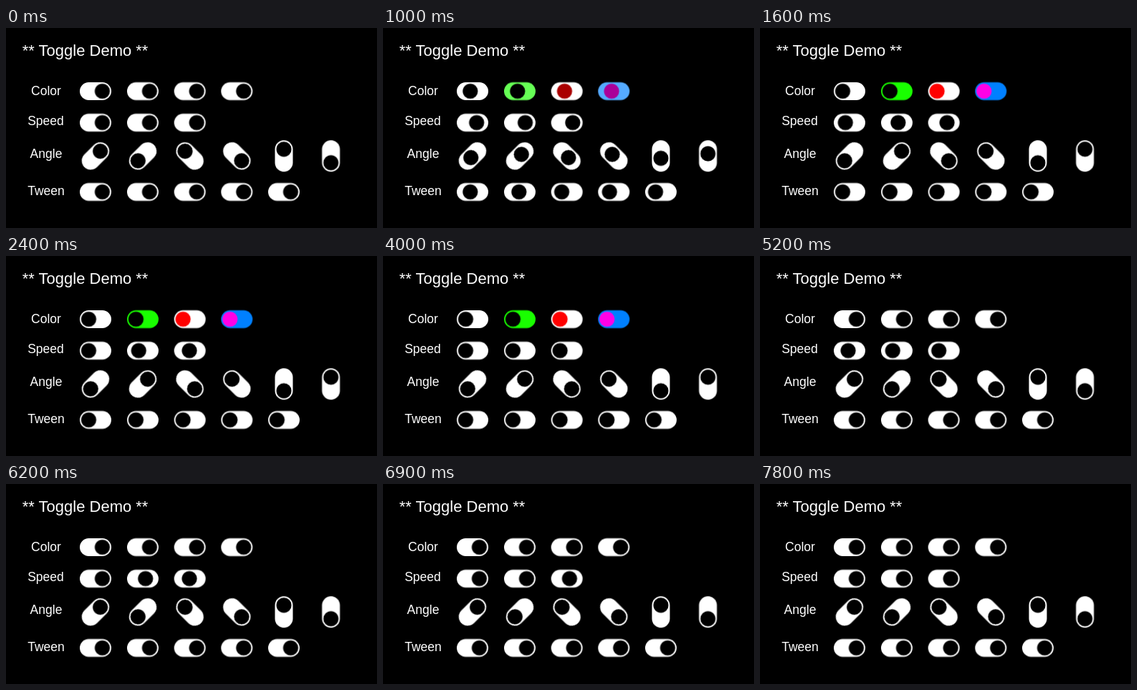
Animation, 518 px wide and 280 px high, one loop 9400 ms. Source, as an HTML page without scripts:

```html
<!DOCTYPE html>
<html lang="en">
<head>
<meta charset="utf-8">
<title>Toggle Demo</title>
<style>
  html, body { margin: 0; width: 100%; height: 100%; overflow: hidden; background: #000; }
  svg { display: block; width: 518px; height: 280px; }
  text { fill: #fff; font: 17.5px "Liberation Sans", Arial, sans-serif; text-anchor: middle; }
  .title { font-size: 22px; }

  /* Each toggle is a track (rect) and a knob (circle) centred on its group */
  rect { x: -22px; y: -12.5px; width: 44px; height: 25px; rx: 12.5px; fill: #fff; }
  circle { r: 10.6px; fill: #000; }
  rect, circle { animation: tint-track 9.4s -10ms infinite; animation-timing-function: var(--ease); }
  circle { animation-name: var(--pace), tint-knob; }

  svg { --pace: quick; --ease: steps(3); --track: #fff; --knob: #000; }
  .green { --track: #19ff00; }
  .red { --knob: #f00; }
  .duo { --track: #0080ff; --knob: #ff00e6; }

  .s1 { --pace: one; --ease: steps(10); }
  .s2 { --pace: two; --ease: steps(20); }
  .s3 { --pace: three; --ease: steps(30); }

  .in { --ease: ease-in; }
  .out { --ease: ease-out; }
  .both { --ease: ease-in-out; }
  .cubic { --ease: cubic-bezier(.65, 0, .35, 1); }

  /* Leaves at 0.8 s, returns at 4.8 s */
  @keyframes quick {
    0%, 8.5106%, 54.2553%, 100% { transform: translateX(9.5px); }
    11.7021%, 51.0638% { transform: translateX(-9.5px); }
  }
  @keyframes one {
    0%, 8.5106%, 61.7021%, 100% { transform: translateX(9.5px); }
    19.1489%, 51.0638% { transform: translateX(-9.5px); }
  }
  @keyframes two {
    0%, 8.5106%, 72.3404%, 100% { transform: translateX(9.5px); }
    29.7872%, 51.0638% { transform: translateX(-9.5px); }
  }
  @keyframes three {
    0%, 8.5106%, 82.9787%, 100% { transform: translateX(9.5px); }
    40.4255%, 51.0638% { transform: translateX(-9.5px); }
  }
  @keyframes tint-track {
    0%, 8.5106%, 54.2553%, 100% { fill: #fff; }
    11.7021%, 51.0638% { fill: var(--track); }
  }
  @keyframes tint-knob {
    0%, 8.5106%, 54.2553%, 100% { fill: #000; }
    11.7021%, 51.0638% { fill: var(--knob); }
  }
</style>
</head>
<body>
<svg viewBox="0 0 518 280">
  <text class="title" x="110.6" y="38.7">** Toggle Demo **</text>
  <text x="56" y="94">Color</text>
  <text x="55.5" y="136">Speed</text>
  <text x="56" y="182">Angle</text>
  <text x="56" y="234">Tween</text>

  <g transform="translate(125 88.5)">
    <g><rect/><circle/></g>
    <g class="green" transform="translate(66)"><rect/><circle/></g>
    <g class="red" transform="translate(131.7)"><rect/><circle/></g>
    <g class="duo" transform="translate(197.3)"><rect/><circle/></g>
  </g>

  <g transform="translate(125 132.5)">
    <g class="s1"><rect/><circle/></g>
    <g class="s2" transform="translate(66)"><rect/><circle/></g>
    <g class="s3" transform="translate(131.7)"><rect/><circle/></g>
  </g>

  <g transform="translate(125 179.2)">
    <g transform="rotate(-45)"><rect/><circle/></g>
    <g transform="translate(66) rotate(135)"><rect/><circle/></g>
    <g transform="translate(131.7) rotate(-135)"><rect/><circle/></g>
    <g transform="translate(197.3) rotate(45)"><rect/><circle/></g>
    <g transform="translate(263) rotate(-90)"><rect/><circle/></g>
    <g transform="translate(328.7) rotate(90)"><rect/><circle/></g>
  </g>

  <g transform="translate(125 229.5)">
    <g><rect/><circle/></g>
    <g class="in" transform="translate(66)"><rect/><circle/></g>
    <g class="out" transform="translate(131.7)"><rect/><circle/></g>
    <g class="both" transform="translate(197.3)"><rect/><circle/></g>
    <g class="cubic" transform="translate(263)"><rect/><circle/></g>
  </g>
</svg>
</body>
</html>
```
